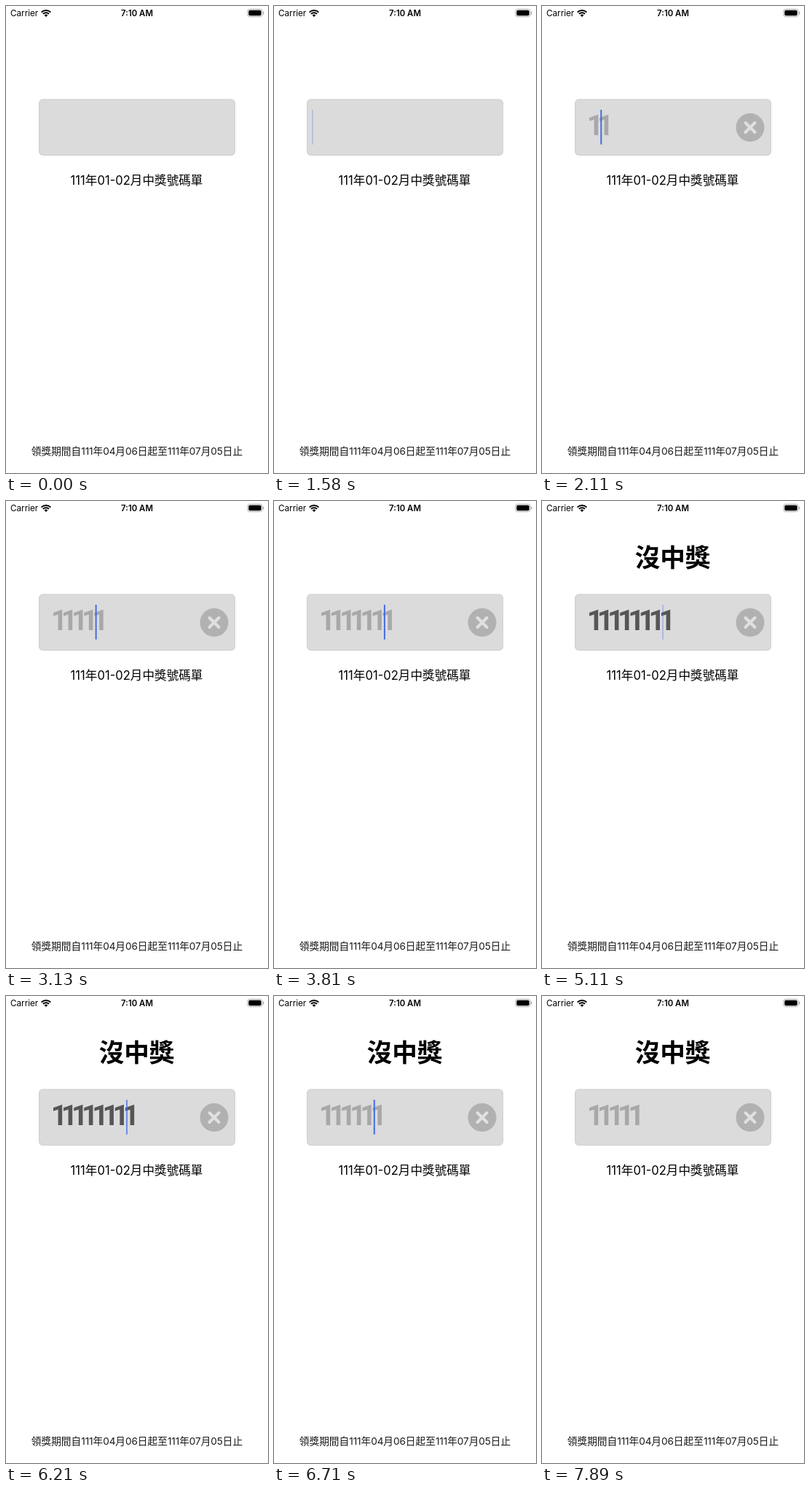
Write an HTML page with a canvas that moves like this. It is 360 px wide and 640 px high and loops after 8000 ms.

```html
<!DOCTYPE html>
<html lang="zh-Hant">
<head>
<meta charset="utf-8">
<title>Prize check</title>
<style>
html, body { margin: 0; width: 100%; height: 100%; overflow: hidden; background: #fff; }
canvas { display: block; width: 360px; height: 640px; }
</style>
</head>
<body>
<canvas id="stage"></canvas>
<script>
const W = 360, H = 640, LOOP = 8000;
const canvas = document.getElementById('stage');
const ctx = canvas.getContext('2d');
const ratio = window.devicePixelRatio || 1;
canvas.width = W * ratio;
canvas.height = H * ratio;

const LATIN = 'Inter, Roboto, sans-serif';
const HAN = '"Noto Sans CJK TC", "Noto Sans CJK JP", "Noto Sans CJK", sans-serif';
const ENTRY = 'Roboto, "Open Sans", sans-serif';

// Keystrokes in ms; the result shows once the number is full
const FOCUS = 700;
const presses = [1770, 2000, 2390, 2730, 3130, 3470, 3810, 4200];
const deletes = [6480, 6710, 7030];
const FULL = presses.length;
const PITCH = 14.13;

const clamp = v => Math.min(1, Math.max(0, v));
const past = (list, t) => list.filter(at => at <= t);

// The cursor stays lit after a key, then fades out and in again
function cursorAlpha(t) {
  if (t < FOCUS) return 0;
  const last = Math.max(FOCUS - 840, ...past(presses, t), ...past(deletes, t));
  const u = (t - last) % 1030;
  return u < 750 ? clamp((750 - u) / 250) : clamp((u - 860) / 170);
}

function setFont(size, family, weight = 400, gap = 0) {
  ctx.font = `${weight} ${size}px ${family}`;
  ctx.letterSpacing = gap + 'px';
}

function text(str, x, y, color = '#000', align = 'left') {
  ctx.fillStyle = color;
  ctx.textAlign = align;
  ctx.fillText(str, x, y);
}

// A centred line with Latin digits and Han characters in their own fonts
function mixedLine(str, cx, y, size, gap, color) {
  const runs = str.match(/[\d-]+|[^\d-]+/g).map(part => {
    const latin = /\d/.test(part);
    const use = () => setFont(size, latin ? LATIN : HAN, 400, latin ? gap : 0);
    use();
    return { part, use, width: ctx.measureText(part).width };
  });
  let x = cx - runs.reduce((sum, run) => sum + run.width, 0) / 2;
  for (const { part, use, width } of runs) {
    use();
    text(part, x, y, color);
    x += width;
  }
}

function box(x, y, w, h, r, fill, stroke) {
  ctx.beginPath();
  ctx.roundRect(x, y, w, h, r);
  if (fill) { ctx.fillStyle = fill; ctx.fill(); }
  if (stroke) { ctx.strokeStyle = stroke; ctx.lineWidth = 1; ctx.stroke(); }
}

function wifi(x, y) {
  const from = -Math.PI * .75, to = -Math.PI * .25;
  ctx.strokeStyle = ctx.fillStyle = '#000';
  ctx.lineWidth = 2;
  for (const r of [9, 5.8]) {
    ctx.beginPath();
    ctx.arc(x, y, r, from, to);
    ctx.stroke();
  }
  ctx.beginPath();
  ctx.moveTo(x, y);
  ctx.arc(x, y, 3.4, from, to);
  ctx.fill();
}

function statusBar() {
  setFont(11.7, LATIN);
  text('Carrier', 6, 14);
  setFont(11.4, LATIN, 600);
  text('7:10 AM', 180, 14, '#000', 'center');
  wifi(55, 15);
  box(331.8, 4.3, 20.4, 10.4, 3, null, '#b0b0b0');
  box(333.3, 5.7, 17.4, 7.6, 1.8, '#000');
  box(353, 7.5, 1.3, 4, .6, '#b0b0b0');
}

function clearButton(x, y) {
  ctx.beginPath();
  ctx.arc(x, y, 19.5, 0, Math.PI * 2);
  ctx.fillStyle = '#b1b1b1';
  ctx.fill();
  ctx.strokeStyle = '#e0e0e0';
  ctx.lineWidth = 4;
  ctx.lineCap = 'round';
  ctx.beginPath();
  for (const s of [-1, 1]) {
    ctx.moveTo(x - 6.5, y - 6.5 * s);
    ctx.lineTo(x + 6.5, y + 6.5 * s);
  }
  ctx.stroke();
  ctx.lineCap = 'butt';
}

function field(t) {
  const count = past(presses, t).length - past(deletes, t).length;
  box(45.5, 128, 269, 76.5, 5, '#dbdbdb', '#cdcdcd');
  if (count) {
    setFont(39.5, ENTRY, 700);
    const one = ctx.measureText('1');
    setFont(39.5, ENTRY, 700, PITCH - one.width);
    text('1'.repeat(count), 53.4 + one.actualBoundingBoxLeft, 177, count === FULL ? '#565656' : '#a8a8a8');
    clearButton(286, 166.5);
  }
  ctx.globalAlpha = cursorAlpha(t);
  box(52 + count * PITCH, 142, 2, 48, 1, '#436be0');
  ctx.globalAlpha = 1;
}

function draw(t) {
  ctx.setTransform(ratio, 0, 0, ratio, 0, 0);
  ctx.fillStyle = '#fff';
  ctx.fillRect(0, 0, W, H);
  statusBar();
  if (t >= presses[FULL - 1]) {
    setFont(34.6, HAN, 700);
    text('沒中獎', 179.5, 90, '#000', 'center');
  }
  field(t);
  mixedLine('111年01-02月中獎號碼單', 179.5, 244.5, 16.6, 0, '#000');
  mixedLine('領獎期間自111年04月06日起至111年07月05日止', 180, 615, 13.7, -.15, '#1a1a1a');
}

function frame(now) {
  draw(now % LOOP);
  requestAnimationFrame(frame);
}
requestAnimationFrame(frame);
</script>
</body>
</html>
```
